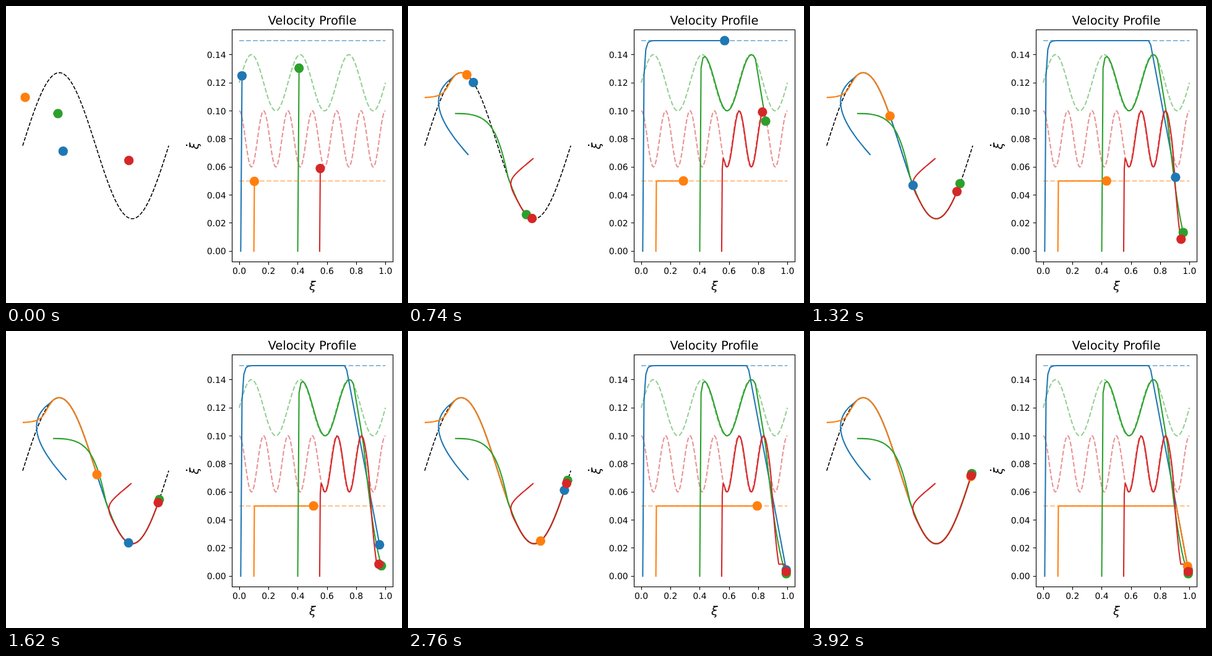
These frames come from a looping animation (640x480 px, 3940 ms). An HTML page:

```html
<!DOCTYPE html>
<html lang="en">
<head>
<meta charset="utf-8">
<title>Velocity Profile</title>
<style>
  html, body { margin: 0; width: 100%; height: 100%; overflow: hidden; background: #fff; }
  svg { display: block; width: 640px; height: 480px; }
  text { font-family: "DejaVu Sans", sans-serif; font-size: 13.89px; fill: #000; text-rendering: geometricPrecision; }
  .large { font-size: 19.44px; }
  .symbol { font-style: italic; }
</style>
</head>
<body>
<svg id="stage" viewBox="0 0 640 480"></svg>
<script>
const FRAME_MS = 20, FRAMES = 197, JOIN = 21, STEP = 0.1, STOP = 0.992, TAU = 2 * Math.PI;
const stage = document.getElementById('stage');

const chartPoint = (xi, v) => [377 + 236.2 * xi, 396.1 - 2267.5 * v];
const wavePoint = s => [27 + 236 * s, 225.8 - 118 * Math.sin(TAU * s)];

// start: first ξ; miss: share of the speed still lacking in the first step; lag: delay behind the profile
// brake: near ξ = 1 the speed is limited to distance * min(high, low + slope * distance), but not below creep
// entry: start and two controls of the curve that meets the wave at position join
// cruise, knee, settle: speed on the wave, remaining way where it slows down, rate of slowing
const robots = [
  {
    color: '#1f77b4', profile: () => 0.15,
    start: 0.01, miss: 0.167, lag: 0, brake: { high: 0.555, low: 0.555, slope: 0, creep: 0 },
    entry: [[97, 240], [58, 196], [26, 148]], join: 0.191, cruise: 0.0089, knee: 0.278, settle: 0.032
  },
  {
    color: '#ff7f0e', profile: () => 0.05,
    start: 0.1, miss: 0.006, lag: 0, brake: { high: 0.555, low: 0.555, slope: 0, creep: 0 },
    entry: [[28, 147.8], [66, 146], [57, 135]], join: 0.2085, cruise: 0.005, knee: 0.09, settle: 0.0555
  },
  {
    color: '#2ca02c', profile: x => 0.12 + 0.02 * Math.sin(3 * TAU * x),
    start: 0.4, miss: 0.065, lag: 0.005, brake: { high: 0.625, low: 0.19, slope: 2.9, creep: 0 },
    entry: [[77, 173.8], [128, 173.3], [143, 188.3]], join: 0.57, cruise: 0.0079, knee: 0.092, settle: 0.0195
  },
  {
    color: '#d62728', profile: x => 0.08 + 0.02 * Math.cos(6 * TAU * x),
    start: 0.55, miss: 0.2, lag: 0.004, brake: { high: 0.67, low: -0.39, slope: 9, creep: 0.0085 },
    entry: [[202, 246.8], [160, 282.3], [158, 280.3]], join: 0.649, cruise: 0.0054, knee: 0.088, settle: 0.0165
  }
];

function add(tag, attrs, text) {
  const el = document.createElementNS('http://www.w3.org/2000/svg', tag);
  for (const key in attrs) el.setAttribute(key, attrs[key]);
  if (text) el.textContent = text;
  return stage.appendChild(el);
}
const toPath = pts => 'M' + pts.map(p => p[0].toFixed(2) + ' ' + p[1].toFixed(2)).join('L');
const sample = (n, fn) => Array.from({ length: n + 1 }, (_, i) => fn(i / n));
const addLine = (pts, color, width, extra) =>
  add('path', { d: toPath(pts), fill: 'none', stroke: color, 'stroke-width': width, ...extra });

function speedAt({ profile, lag, miss, brake }, xi, n) {
  const rest = 1 - xi;
  const wanted = profile(xi - lag) * (1 - miss * 0.25 ** n);
  const limit = rest * Math.min(brake.high, brake.low + brake.slope * rest);
  return Math.max(Math.min(wanted, limit), Math.min(brake.creep, 0.4 * rest));
}

function chartTrail(robot) {
  const pts = [chartPoint(robot.start, 0)];
  let xi = robot.start + 0.7 * STEP * speedAt(robot, robot.start, 0);
  for (let n = 0; n < FRAMES; n++) {
    const v = speedAt(robot, xi, n);
    pts.push(chartPoint(xi, v));
    xi = Math.min(STOP, xi + STEP * v);
  }
  return pts;
}

const bezier = (a, b, c, d) => t => [0, 1].map(k =>
  (1 - t) ** 3 * a[k] + 3 * t * (1 - t) ** 2 * b[k] + 3 * t * t * (1 - t) * c[k] + t ** 3 * d[k]);

// Points at equal distances along a curve.
function evenly(curve, steps) {
  const dense = sample(400, curve);
  const lengths = [0];
  for (let i = 1; i < dense.length; i++)
    lengths.push(lengths[i - 1] + Math.hypot(dense[i][0] - dense[i - 1][0], dense[i][1] - dense[i - 1][1]));
  const total = lengths[lengths.length - 1];
  return sample(steps, t => dense[lengths.findIndex(l => l >= t * total)]);
}

function waveTrail({ entry, join, cruise, knee, settle }) {
  const pts = evenly(bezier(...entry, wavePoint(join)), JOIN + 1);
  let rest = 1 - join;
  while (pts.length <= FRAMES) {
    rest -= rest > knee ? cruise : settle * rest;
    pts.push(wavePoint(1 - rest));
  }
  return pts;
}

function drawCurves() {
  add('rect', { width: 640, height: 480, fill: '#fff' });
  addLine(sample(200, wavePoint), '#000', 1.6, { 'stroke-dasharray': '5.9 2.55' });
  for (const { profile, color } of robots)
    addLine(sample(300, t => chartPoint(t, profile(t))), color, 2.08,
      { 'stroke-dasharray': '7.71 3.33', opacity: 0.5 });
}

function drawAxes() {
  add('rect', { x: 365.5, y: 38.5, width: 260, height: 375, fill: 'none', stroke: '#000', 'stroke-width': 1.11 });
  const tick = d => add('path', { d, stroke: '#000', 'stroke-width': 1.11 });
  for (let i = 0; i < 6; i++) {
    const x = chartPoint(i / 5, 0)[0];
    tick(`M${Math.round(x) + 0.5} 413.5v4.9`);
    add('text', { x, y: 433, 'text-anchor': 'middle' }, (i / 5).toFixed(1));
  }
  for (let i = 0; i < 8; i++) {
    const y = chartPoint(0, i / 50)[1];
    tick(`M365.5 ${Math.floor(y) + 0.5}h-4.9`);
    add('text', { x: 355.6, y: Math.round(y + 5.25), 'text-anchor': 'end' }, (i / 50).toFixed(2));
  }
  const label = { class: 'large symbol', 'text-anchor': 'middle' };
  add('text', { class: 'large', x: 495, y: 30, 'text-anchor': 'middle' }, 'Velocity Profile');
  add('text', { ...label, x: 495.4, y: 459 }, 'ξ');
  add('text', { ...label, transform: 'translate(310.5 226) rotate(-90)' }, 'ξ');
  add('circle', { cx: 292, cy: 225, r: 1.25 });
}

drawCurves();
const tracks = robots.flatMap(robot =>
  [waveTrail(robot), chartTrail(robot)].map(pts => ({ pts, color: robot.color })));
for (const track of tracks)
  track.line = addLine(track.pts, track.color, 2.08, { 'stroke-linejoin': 'round', 'stroke-linecap': 'square' });
for (const track of tracks)
  track.dot = add('circle', { r: 7.64, fill: track.color });
drawAxes();

function render(ms) {
  const n = Math.floor(ms / FRAME_MS) % FRAMES;
  for (const { pts, line, dot } of tracks) {
    line.setAttribute('d', toPath(pts.slice(0, n + 2)));
    dot.setAttribute('cx', pts[n + 1][0]);
    dot.setAttribute('cy', pts[n + 1][1]);
  }
}

const began = performance.now();
function loop() {
  render(performance.now() - began);
  requestAnimationFrame(loop);
}
loop();
</script>
</body>
</html>
```
